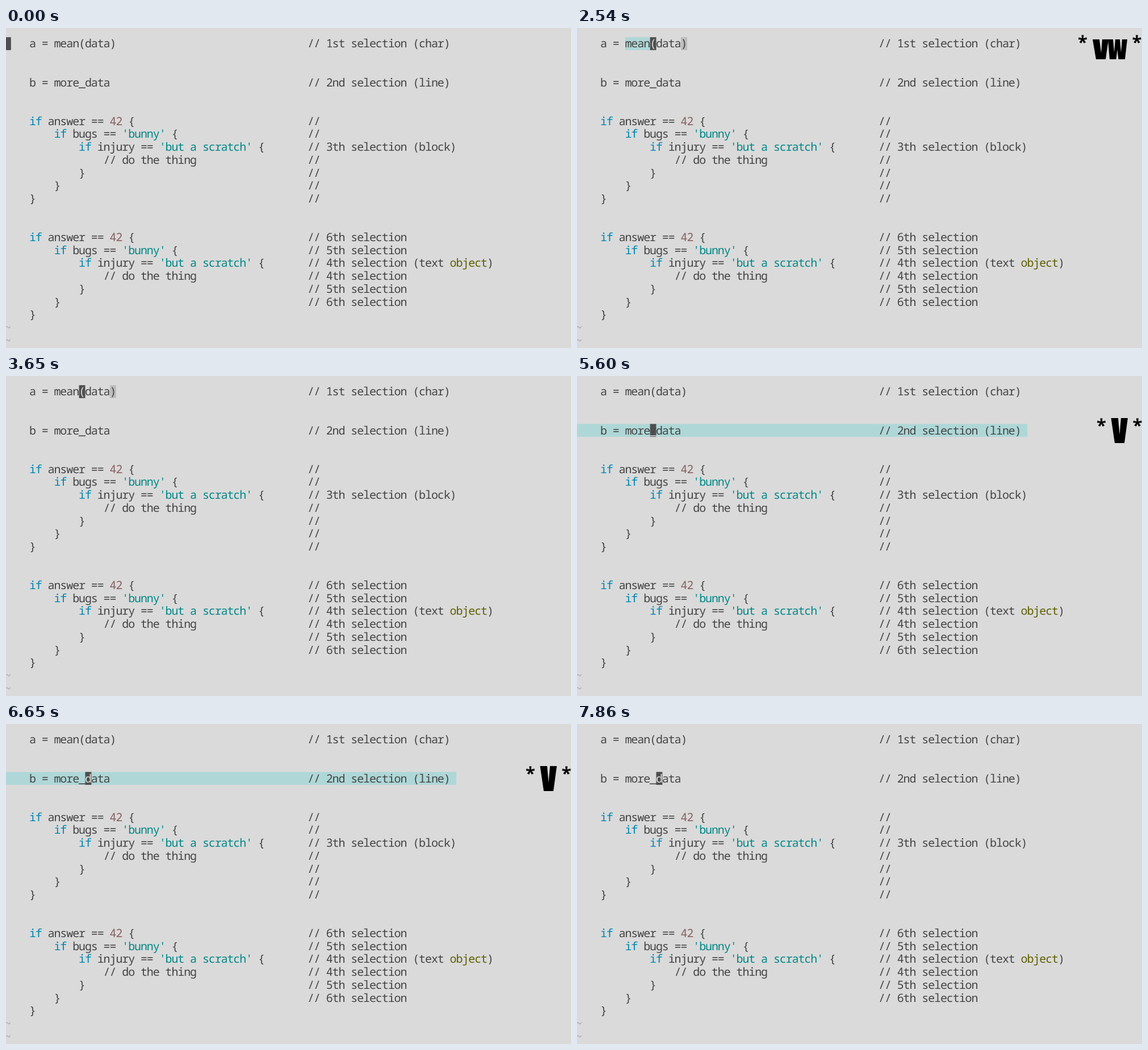
An HTML page for the animation above (8000 ms loop, 995 by 563 pixels).

```html
<!DOCTYPE html>
<html lang="en">
<head>
<meta charset="utf-8">
<title>Editor selections</title>
<style>
html, body { margin: 0; width: 100%; height: 100%; overflow: hidden; background: #dadada; }
svg { display: block; width: 995px; height: 563px; }
text { font: 20px "Noto Sans Mono", "DejaVu Sans Mono", monospace; font-stretch: 87.5%;
  text-anchor: middle; white-space: pre; fill: #444; text-rendering: geometricPrecision; }
.word { fill: #0087af; }
.str { fill: #008787; }
.num { fill: #875f5f; }
.type { fill: #5f5f00; }
.tilde { fill: #a8a8a8; }
.block { fill: #4e4e4e; }
.under { fill: #dadada; }
.sel { fill: #afd7d7; }
.match { fill: #bcbcbc; }
.star { font: 700 31px "Open Sans", sans-serif; fill: #000; }

.show { opacity: 0; animation: 8s step-end infinite; }
#home { animation-name: home; }
#onM { animation-name: onM; }
#onParen, #match { animation-name: onParen; }
#onBar { animation-name: onBar; }
#onD { animation-name: onD; }
#chars { animation-name: chars; }
#line { animation-name: line; }
#keysVw { animation-name: keysVw; }
#keysV { animation-name: keysV; }
@keyframes home { 0% { opacity: 1 } 18.625%, 100% { opacity: 0 } }
@keyframes onM { 0% { opacity: 0 } 18.625% { opacity: 1 } 31.75%, 100% { opacity: 0 } }
@keyframes onParen { 0% { opacity: 0 } 31.75% { opacity: 1 } 57.5%, 100% { opacity: 0 } }
@keyframes onBar { 0% { opacity: 0 } 57.5% { opacity: 1 } 83.125%, 100% { opacity: 0 } }
@keyframes onD { 0% { opacity: 0 } 83.125%, 100% { opacity: 1 } }
@keyframes chars { 0% { opacity: 0 } 31.75% { opacity: 1 } 40.75%, 100% { opacity: 0 } }
@keyframes line { 0% { opacity: 0 } 70% { opacity: 1 } 92.625%, 100% { opacity: 0 } }
@keyframes keysVw { 0% { opacity: 0 } 18.625% { opacity: 1 } 45.625%, 100% { opacity: 0 } }
@keyframes keysV { 0% { opacity: 0 } 57.5% { opacity: 1 } 98.25%, 100% { opacity: 0 } }
</style>
</head>
<body>
<svg viewBox="0 0 995 563">
  <g id="back"></g>
  <g id="code"></g>
  <g id="cursors"></g>
  <g id="keysVw" class="show" role="img" aria-label="vw">
    <text class="star" x="890.5" y="36">*</text>
    <path d="M908 20H920L923 44L925 20H936L931 55H914Z"/>
    <path d="M935 20H944L946 43L948 20H956L958 43L960 20H969L965 55H953.5L951.5 38L949.5 55H938Z"/>
    <text class="star" x="986" y="36">*</text>
  </g>
  <g id="keysV" class="show" role="img" aria-label="V">
    <text class="star" x="923.5" y="98">*</text>
    <path d="M940.5 74H953L955.5 103L958 74H970L964 118H947Z"/>
    <text class="star" x="987" y="98">*</text>
  </g>
</svg>
<script>
const cellW = 10.892, cellH = 22.71, left = -2.1, top0 = 16.2, rise = 18.2;
const nested = [
  "if answer == 42 {",
  "    if bugs == 'bunny' {",
  "        if injury == 'but a scratch' {",
  "            // do the thing",
  "        }",
  "    }",
  "}"
];
const code = ["a = mean(data)", "", "", "b = more_data", "", "", ...nested, "", "", ...nested];
const notes = [
  "1st selection (char)", null, null, "2nd selection (line)", null, null,
  "", "", "3th selection (block)", "", "", "", "", null, null,
  "6th selection", "5th selection", "4th selection (text object)",
  "4th selection", "5th selection", "6th selection"
];
const styles = { if: "word", 42: "num", object: "type", "~": "tilde" };

const get = id => document.getElementById(id);

function add(parent, tag, attrs) {
  const node = document.createElementNS("http://www.w3.org/2000/svg", tag);
  for (const key in attrs) node.setAttribute(key, attrs[key]);
  return parent.appendChild(node);
}

// One x per character keeps the text on the terminal grid.
function put(parent, str, col, row, cls) {
  const x = [...str].map((c, i) => (left + (col + i + 0.5) * cellW).toFixed(2));
  const y = (top0 + row * cellH + rise).toFixed(2);
  add(parent, "text", { x: x.join(" "), y, class: cls }).textContent = str;
}

function cells(parent, col, row, count, cls) {
  return add(parent, "rect", {
    x: left + col * cellW, y: top0 + row * cellH,
    width: count * cellW, height: cellH, class: cls
  });
}

function print(line, col, row) {
  for (const m of line.matchAll(/'[^']*'|\w+|[^\s\w']+/g)) {
    const cls = m[0][0] === "'" ? "str" : styles[m[0]] || "";
    put(get("code"), m[0], col + m.index, row, cls);
  }
}

function cursor(id, col, row, char) {
  const group = add(get("cursors"), "g", { id, class: "show" });
  cells(group, col, row, 1, "block");
  put(group, char, col, row, "under");
}

code.forEach((line, row) => print(line, 4, row));
notes.forEach((note, row) => {
  if (note !== null) print(("// " + note).trim(), 49, row);
});
print("~", 0, 22);
print("~", 0, 23);

cells(get("back"), 8, 0, 4, "sel show").id = "chars";
cells(get("back"), 0, 3, 73, "sel show").id = "line";
cells(get("back"), 17, 0, 1, "match show").id = "match";

cursor("home", 0, 0, " ");
cursor("onM", 8, 0, "m");
cursor("onParen", 12, 0, "(");
cursor("onBar", 12, 3, "_");
cursor("onD", 13, 3, "d");
</script>
</body>
</html>
```
